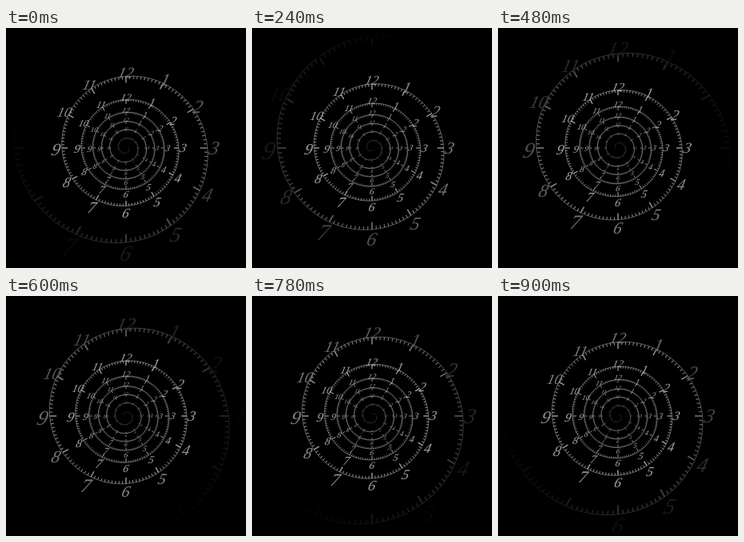
Animation of 300 by 300 pixels, one loop 960 ms. Source, as an HTML page with a canvas:

```html
<!DOCTYPE html>
<html lang="en">
<head>
<meta charset="utf-8">
<title>Spiral clock</title>
<style>
  html, body { margin: 0; width: 100%; height: 100%; overflow: hidden; background: #000; }
  canvas { display: block; width: 300px; height: 300px; }
</style>
</head>
<body>
<canvas id="stage"></canvas>
<script>
const SIZE = 300, MID = SIZE / 2;
const LOOP = 960, STEP = 60;
const TICKS = 120;            // per turn
const NEAR = 1.12, FAR = 7.8; // visible depth range
const TAU = Math.PI * 2;

const canvas = document.getElementById('stage');
const ctx = canvas.getContext('2d');
const dpr = window.devicePixelRatio || 1;
canvas.width = canvas.height = SIZE * dpr;

const smooth = (a, b, x) => {
  const k = Math.min(1, Math.max(0, (x - a) / (b - a)));
  return k * k * (3 - 2 * k);
};

// A helix seen from its axis: the radius falls with depth and closes at the far end.
const radius = z => (5.5 + 169 / z) * (1 - (z / 8) ** 4);

const farFade = z => 1 - 0.7 * smooth(5.8, 7.6, z);
const trackLight = z => (0.5 * smooth(NEAR, 1.9, z) + 0.25 * smooth(1.6, 2.6, z)) * farFade(z);
const numeralLight = z => (0.42 * smooth(1.28, 2, z) + 0.23 * smooth(1.7, 2.6, z)) * farFade(z);

const grey = v => {
  const c = Math.round(255 * v);
  return `rgb(${c},${c},${c})`;
};

function point(turn, r) {
  const a = -turn * TAU;
  return [MID + r * Math.sin(a), MID - r * Math.cos(a)];
}

function line(from, to, width, shade) {
  ctx.strokeStyle = grey(shade);
  ctx.lineWidth = width;
  ctx.beginPath();
  ctx.moveTo(...from);
  ctx.lineTo(...to);
  ctx.stroke();
}

function numeral(hour, turn, r, shade) {
  const [x, y] = point(turn, r * (1.085 - 0.035 * Math.cos(turn * TAU)));
  const hangs = hour === 9 || hour === 7;
  const scale = r * (hour > 9 ? 0.21 : hangs ? 0.27 : 0.235) / 20;
  ctx.save();
  ctx.translate(x, y);
  ctx.transform(scale, 0, -0.25 * scale, scale, 0, 0);
  ctx.fillStyle = grey(shade);
  ctx.fillText(hour, 0, hangs ? 8.5 : 6.6);
  ctx.restore();
}

function draw(phase) {
  ctx.setTransform(dpr, 0, 0, dpr, 0, 0);
  ctx.fillStyle = '#000';
  ctx.fillRect(0, 0, SIZE, SIZE);
  ctx.font = 'italic 20px "Liberation Serif", serif';
  ctx.textAlign = 'center';

  for (let i = 0; i < FAR * TICKS; i++) {
    const turn = i / TICKS, z = turn + phase;
    if (z < NEAR || z > FAR) continue;
    const r = radius(z), shade = trackLight(z);
    const isHour = i % (TICKS / 12) === 0;
    const next = turn + 1 / TICKS;

    line(point(turn, r), point(next, radius(next + phase)), Math.max(0.6, r * 0.008), shade * 0.85);
    line(point(turn, r * (isHour ? 0.91 : 0.96)), point(turn, r),
      isHour ? Math.max(0.7, r * 0.016) : Math.max(0.4, r * 0.011), shade);
    if (isHour) numeral(12 - i / (TICKS / 12) % 12, turn, r, numeralLight(z));
  }
}

const start = performance.now();
let shown = -1;
function frame(now) {
  const step = Math.floor(Math.max(0, now - start) % LOOP / STEP);
  if (step !== shown) {
    shown = step;
    draw(step * STEP / LOOP);
  }
  requestAnimationFrame(frame);
}
draw(0);
requestAnimationFrame(frame);
</script>
</body>
</html>
```
